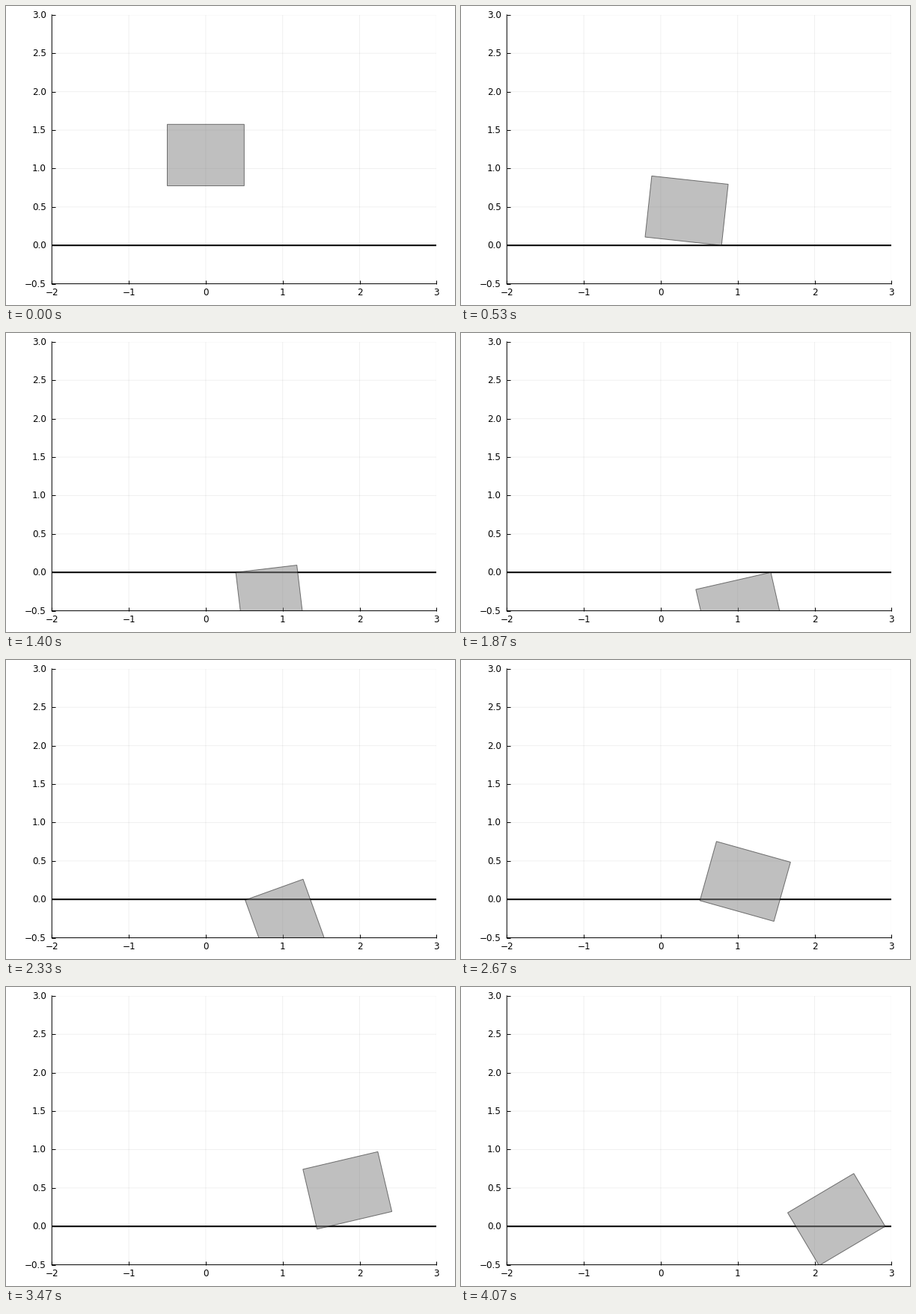
A matplotlib script that plays this animation: 600x400 px, repeating every 4140 ms.

```python
import numpy as np
import matplotlib.pyplot as plt
from matplotlib.animation import FuncAnimation
from matplotlib.patches import Polygon

W, H, DPI = 600, 400, 100
PX = 72 / DPI
LOOP, TICK, FPS = 4140, 20, 15
UNIT, LEFT, BOTTOM = 102.8, 61.3, 371.61

plt.rcParams["font.family"] = "DejaVu Sans"
plt.rcParams["path.snap"] = False

# Box corners in body coordinates, from bottom left round to top left
BOX = np.array([[-0.5, -0.4], [0.5, -0.4], [0.5, 0.4], [-0.5, 0.4]])
BL, BR = 0, 1

# The box rests for one picture at each of these moments of contact
RESTS = np.array([9, 11, 12, 13, 30, 38, 43, 55])

# Poses at the contacts: step, centre x, angle in degrees
POSES = [(0, 0, 0), (8, 0.337, -6.2), (9, 0.348, 0), (25, 1.04, -180),
         (36, 1.126, 0.5), (46.2, 1.937, 1.5), (53, 2.284, 30.7)]

# Between two poses: corner on the ground, slowing of x, slowing of the turn
MOVES = [(BR, 0, 0), (BR, 0, 0), (BL, 0.61, 27),
         (BL, -0.083, 112), (BL, 0, 114), (BR, 0, -26)]


def arc(a, b, bulge, p):
    """Move from a to b under constant acceleration."""
    return a + (b - a) * p + bulge * p * (1 - p)


def corner_height(move, step, p):
    if move == 0:
        return 0.775 * (1 - p * p)
    sinking = MOVES[move][0] == BL and step > 25
    return -0.0018 * (step - 25) if sinking else 0


def corners(picture):
    step = picture - np.sum(RESTS <= picture)
    move = max(i for i in range(len(MOVES)) if i == 0 or POSES[i][0] < step)
    (s0, x0, a0), (s1, x1, a1) = POSES[move:move + 2]
    pivot, slow_x, slow_turn = MOVES[move]
    p = (step - s0) / (s1 - s0)
    t = np.radians(arc(a0, a1, slow_turn, p))
    c, s = np.cos(t), np.sin(t)
    pts = BOX @ np.array([[c, s], [-s, c]])
    lift = corner_height(move, step, p) - pts[pivot, 1]
    return pts + [arc(x0, x1, slow_x, p), lift]


fig = plt.figure(figsize=(W / DPI, H / DPI), dpi=DPI, facecolor="white")
ax = fig.add_axes([LEFT / W, 1 - BOTTOM / H, 5 * UNIT / W, 3.5 * UNIT / H])
ax.set(xlim=(-2, 3), ylim=(-0.5, 3))
xticks, yticks = np.arange(-2, 4), np.arange(-0.5, 3.1, 0.5)
ax.set_xticks(xticks)
ax.set_yticks(yticks)
ax.tick_params(direction="in", length=5 * PX, width=PX,
               labelbottom=False, labelleft=False)
ax.set_axisbelow(True)
ax.grid(color="black", alpha=0.06, linewidth=PX)
ax.spines[["top", "right"]].set_visible(False)
ax.spines[["left", "bottom"]].set_linewidth(PX)


def label(text, xy, offset, ha):
    ax.annotate(text.replace("-", "\u2212"), xy, xytext=offset,
                textcoords="offset pixels", ha=ha, va="baseline",
                fontsize=12 * PX, annotation_clip=False)


for v in xticks:
    label(f"{v}", (v, -0.5), (0, -15.4), "center")
for v in yticks:
    label(f"{v:.1f}", (-2, v), (-7.7, -4), "right")

ax.plot([-2, 3], [0, 0], color="black", linewidth=2 * PX,
        solid_capstyle="butt", zorder=2)
box = Polygon(corners(0), closed=True, facecolor=(0.5, 0.5, 0.5, 0.5),
              edgecolor=(0, 0, 0, 0.5), linewidth=PX, zorder=2.2)
ax.add_patch(box)


def draw(n):
    picture = int((n * TICK + 15) * FPS / 1000)
    box.set_xy(corners(min(picture, 61)))
    return (box,)


anim = FuncAnimation(fig, draw, frames=LOOP // TICK, interval=TICK,
                     repeat=True, repeat_delay=0, blit=False)
plt.show()
```
